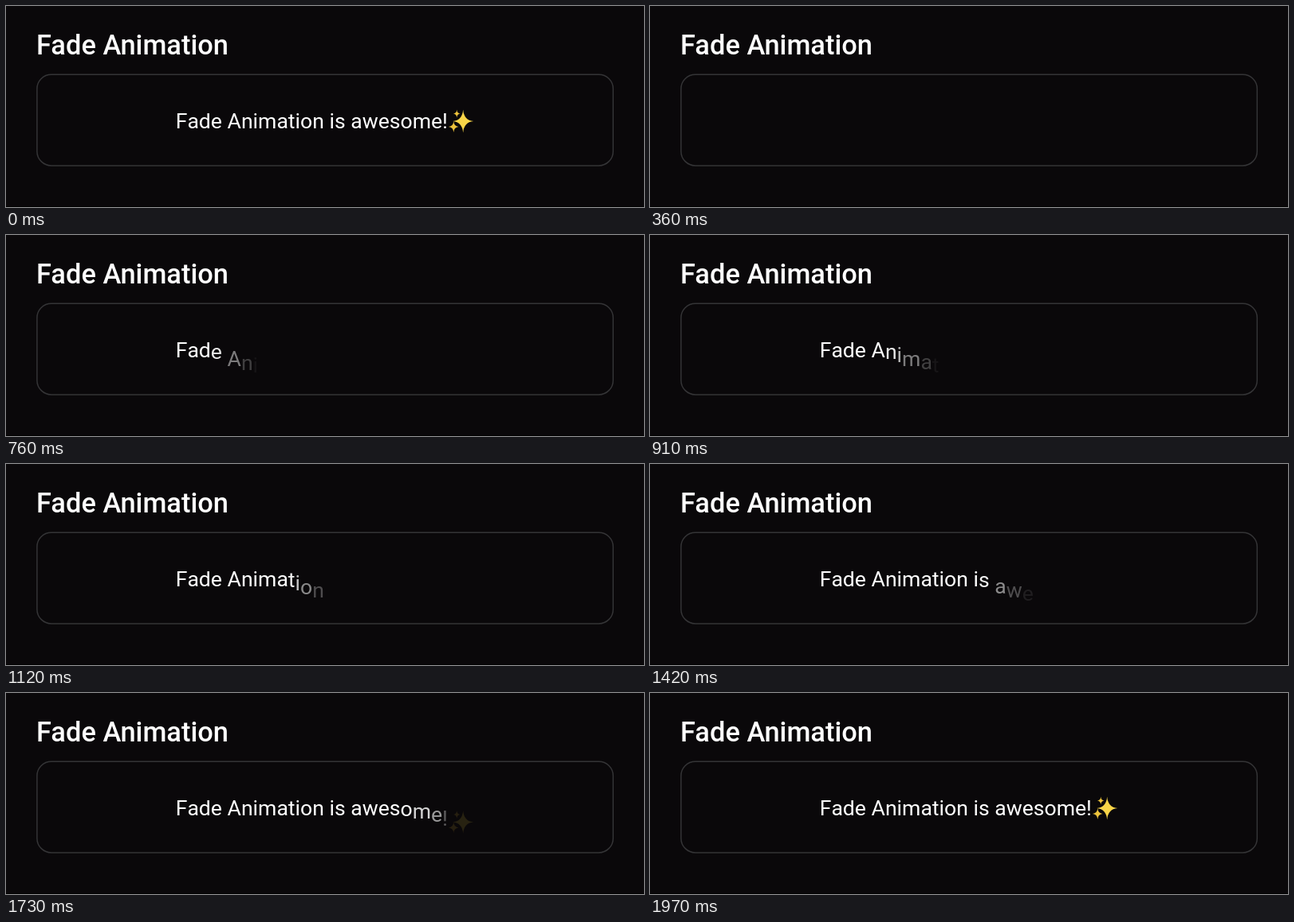
An HTML page with a canvas for the animation above (2000 ms loop, 800 by 253 pixels).

```html
<!DOCTYPE html>
<html lang="en">
<head>
<meta charset="utf-8">
<title>Fade Animation</title>
<style>
  html, body { margin: 0; height: 100%; overflow: hidden; background: #0a080a; }
  canvas { display: block; }
</style>
</head>
<body>
<canvas id="stage" width="800" height="253"></canvas>
<script>
const ctx = document.getElementById('stage').getContext('2d');

const LOOP = 2000, CLEAR = 60;                    // ms
const START = 371, STAGGER = 49.75, FADE = 295;   // ms
const RISE = 20, LEFT = 212.7, BASELINE = 154;    // px
const TITLE_FONT = '500 34.4px Roboto, sans-serif';
const TEXT_FONT = '400 26.6px Roboto, sans-serif';

// Four-pointed star with concave sides
function star(x, y, rx, ry, color) {
  const k = 0.08;
  ctx.fillStyle = color;
  ctx.beginPath();
  ctx.moveTo(x, y - ry);
  ctx.quadraticCurveTo(x + rx * k, y - ry * k, x + rx, y);
  ctx.quadraticCurveTo(x + rx * k, y + ry * k, x, y + ry);
  ctx.quadraticCurveTo(x - rx * k, y + ry * k, x - rx, y);
  ctx.quadraticCurveTo(x - rx * k, y - ry * k, x, y - ry);
  ctx.fill();
}

function sparkles(x, y) {
  star(x + 19.2, y - 9, 13, 14.5, '#f8d548');
  star(x + 7.3, y - 2, 6.3, 7, '#ecc23c');
  star(x + 11.3, y - 18.5, 4.3, 5, '#ecc23c');
}

function layOut(text) {
  ctx.font = TEXT_FONT;
  let x = LEFT;
  const glyphs = [...text].map(char => {
    const glyph = { x, draw: (gx, gy) => ctx.fillText(char, gx, gy) };
    x += ctx.measureText(char).width;
    return glyph;
  });
  return [...glyphs, { x, draw: sparkles }];
}

const glyphs = layOut('Fade Animation is awesome!');

function progress(time, index) {
  if (time < CLEAR) return 1;
  const p = (time - START - index * STAGGER) / FADE;
  const c = Math.min(1, Math.max(0, p));
  return c * c * (3 - 2 * c);
}

function drawPanel() {
  ctx.fillStyle = '#0a080a';
  ctx.fillRect(0, 0, 800, 253);
  ctx.fillStyle = '#000';
  ctx.fillRect(0, 252, 800, 1);
  ctx.strokeStyle = '#343436';
  ctx.lineWidth = 1.5;
  ctx.beginPath();
  ctx.roundRect(38.9, 86.3, 722.4, 114.6, 18);
  ctx.stroke();
  ctx.fillStyle = '#fff';
  ctx.font = TITLE_FONT;
  ctx.fillText('Fade Animation', 38, 61);
}

function render(now) {
  const time = now % LOOP;
  drawPanel();
  ctx.font = TEXT_FONT;
  glyphs.forEach(({ x, draw }, i) => {
    const p = progress(time, i);
    if (!p) return;
    ctx.globalAlpha = p;
    ctx.fillStyle = '#fff';
    draw(x, BASELINE + RISE * (1 - p));
  });
  ctx.globalAlpha = 1;
}

let origin;
function tick(now) {
  origin ??= now;
  render(now - origin);
  requestAnimationFrame(tick);
}
requestAnimationFrame(tick);
</script>
</body>
</html>
```
